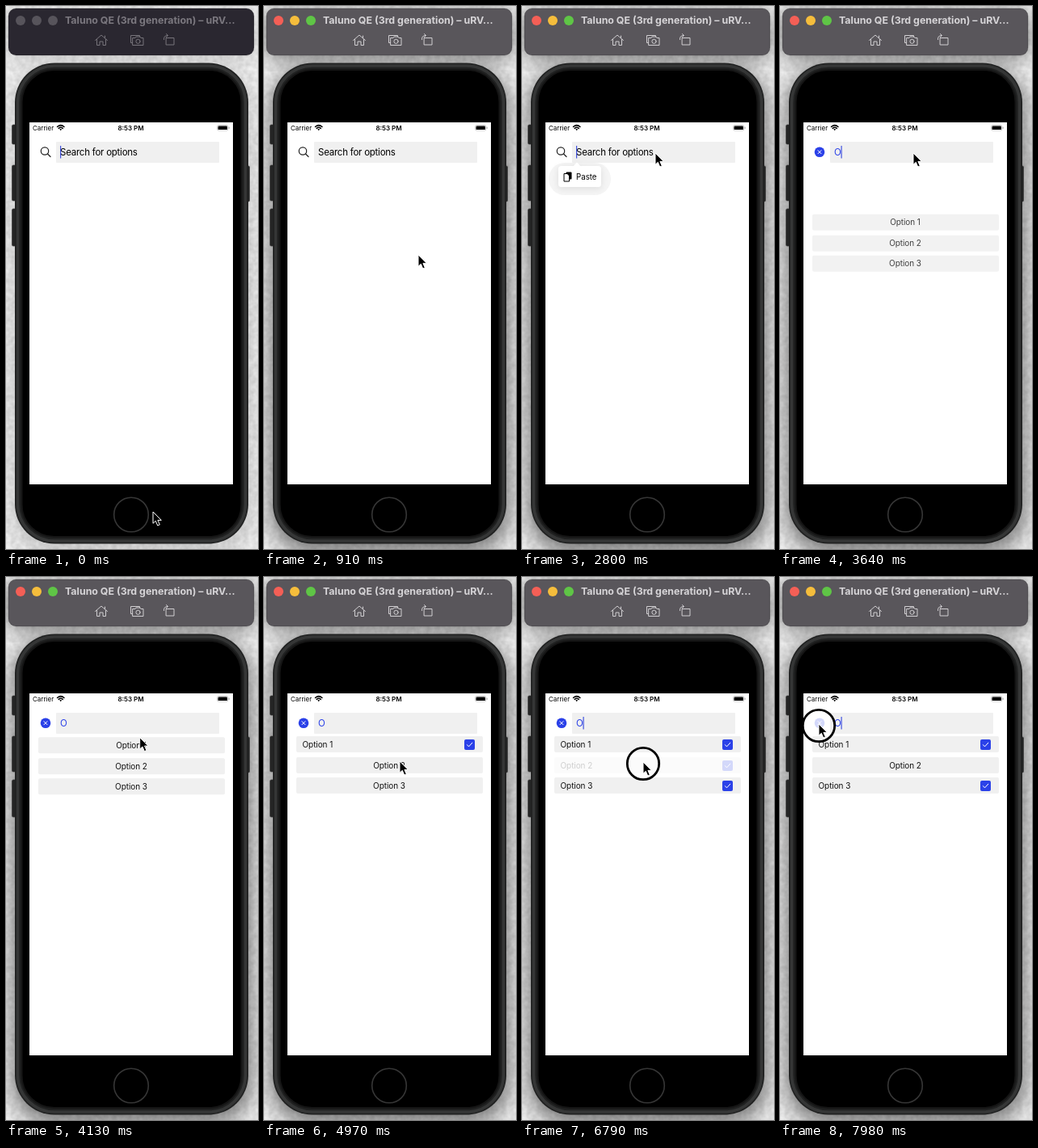
These frames come from a looping animation (312x672 px, 8 s). An HTML page:

```html
<!DOCTYPE html>
<html lang="en">
<head>
<meta charset="utf-8">
<title>Searchable options demo</title>
<style>
  html, body { margin: 0; width: 100%; height: 100%; overflow: hidden; background: #e6e6e6; }
  svg { display: block; width: 312px; height: 672px; font-family: Inter, "Liberation Sans", sans-serif; }
  .shadow { opacity: .16; }
  .bar { fill: #2a2730; }
  .title { fill: #7b787f; font: 700 12.4px Inter, "Liberation Sans", sans-serif; }
  .light { fill: #57545b; }
  .tools { fill: none; stroke: #77747b; stroke-width: 1; stroke-linejoin: round; stroke-linecap: round; }
  .active .shadow { opacity: .5; }
  .active .bar { fill: #59565b; }
  .active .title { fill: #d6d4d7; }
  .active .tools { stroke: #d0ced1; }
  .active .red { fill: #f45f56; }
  .active .yellow { fill: #f5bd3c; }
  .active .green { fill: #5fc546; }
  .field { font-size: 11.5px; letter-spacing: -.24px; }
  .option { font-size: 10px; letter-spacing: -.07px; fill: #111; }
  .blue { fill: #2b41e8; }
  .line { fill: none; stroke-linecap: round; stroke-linejoin: round; }
</style>
</head>
<body>
<svg id="stage" viewBox="0 0 312 672">
  <defs>
    <filter id="plaster" x="0" y="0" width="100%" height="100%" color-interpolation-filters="sRGB">
      <feTurbulence type="fractalNoise" baseFrequency=".16" numOctaves="2" seed="4"/>
      <feColorMatrix values=".16 0 0 0 .825  .16 0 0 0 .825  .16 0 0 0 .825  0 0 0 0 1"/>
    </filter>
    <filter id="blur" x="-30%" y="-30%" width="160%" height="160%"><feGaussianBlur stdDeviation="13"/></filter>
    <filter id="soft" x="-50%" y="-80%" width="200%" height="260%">
      <feDropShadow dx="0" dy="2" stdDeviation="4" flood-opacity=".1"/>
    </filter>
  </defs>

  <rect width="312" height="672" filter="url(#plaster)"/>
  <g class="shadow">
    <rect x="8" y="76" width="296" height="600" rx="50" filter="url(#blur)"/>
    <rect x="3" y="8" width="304" height="56" rx="10" filter="url(#blur)"/>
  </g>

  <!-- Window bar -->
  <rect class="bar" x="3" y="3" width="304" height="58" rx="9.5" stroke="#000" stroke-opacity=".35" stroke-width=".6"/>
  <circle class="light red" cx="18" cy="18" r="6"/>
  <circle class="light yellow" cx="38" cy="18" r="6"/>
  <circle class="light green" cx="58" cy="18" r="6"/>
  <text class="title" x="73" y="22">Taluno QE (3rd generation) – uRV...</text>
  <g class="tools">
    <path d="M110.5 42.5L118 36l7.500 6.500M112.500 41.500V48.500H116V44H120V48.500H123.500V41.500M122.500 39.500V37"/>
    <path d="M156.500 45.500H154.500V36.500H165.500V38M157 39.500H160L161 38H166L167 39.500H170V48.500H157Z"/>
    <circle cx="163.500" cy="43.800" r="2.600"/>
    <path d="M198.500 39.500H208V48H198.500ZM195.500 41.500Q195 36.500 200 36.500M198.500 34.500L200.500 36.500L198.500 38.500"/>
  </g>

  <!-- Phone -->
  <g fill="#242424" stroke="#353535" stroke-width=".7">
    <rect x="7.500" y="147" width="6" height="24" rx="1.500"/>
    <rect x="7.500" y="197" width="6" height="44" rx="1.500"/>
    <rect x="7.500" y="251" width="6" height="46" rx="1.500"/>
    <rect x="296" y="198" width="5.500" height="44" rx="1.500"/>
  </g>
  <rect x="11" y="70.500" width="289" height="595" rx="49" fill="#202121"/>
  <rect x="14.500" y="74" width="282" height="588" rx="45.500" fill="none" stroke="#353636" stroke-width="3.500"/>
  <rect x="19.500" y="79" width="272" height="578" rx="40" stroke="#151515" stroke-width="2"/>
  <circle cx="155" cy="629.500" r="21.300" fill="none" stroke="#363636" stroke-width="1.600"/>
  <rect x="29" y="144" width="252" height="448" fill="#fff"/>

  <!-- Status line -->
  <text x="33" y="154" font-size="8">Carrier</text>
  <text x="154.500" y="154" font-size="8" font-weight="600" text-anchor="middle">8:53 PM</text>
  <g class="line" stroke="#000" stroke-width="1.500" stroke-linecap="butt">
    <path d="M63.500 149.500Q67.700 145.700 72 149.500M65.200 151.400Q67.700 149.200 70.300 151.400"/>
  </g>
  <path d="M66.300 152.500Q67.700 151.500 69.200 152.500L67.700 154.200Z"/>
  <rect x="261.500" y="147.500" width="13.500" height="6.600" rx="2" fill="none" stroke="#aaa" stroke-width=".6"/>
  <rect x="262.500" y="148.500" width="11.500" height="4.600" rx="1.200"/>
  <path d="M276 149.700v2.200" stroke="#999"/>

  <!-- Search field -->
  <rect x="62" y="168" width="202" height="26" rx="1" fill="#f0f0f0"/>
  <g id="empty">
    <text class="field" x="67" y="185">Search for options</text>
    <g class="line" stroke="#222" stroke-width="1.200"><circle cx="48" cy="179.500" r="4.700"/><path d="M51.500 183L55 186.500"/></g>
  </g>
  <g id="filled">
    <text class="field blue" x="67" y="185">O</text>
    <g id="clear">
      <circle class="blue" cx="49" cy="180.700" r="6.300"/>
      <path class="line" d="M47 178.700l4 4m0-4l-4 4" stroke="#fff" stroke-width="1"/>
    </g>
  </g>
  <rect id="caret" y="173" width="1.200" height="15.500" fill="#4052dd"/>

  <g id="popup">
    <rect x="33" y="194" width="77" height="40" rx="20" fill="#f5f5f5"/>
    <path d="M49 198H64L68 193.500L72 198H94a4 4 0 0 1 4 4V220a4 4 0 0 1-4 4H49a4 4 0 0 1-4-4V202a4 4 0 0 1 4-4Z" fill="#fff" filter="url(#soft)"/>
    <rect x="54.500" y="205.500" width="7" height="9" rx="1"/>
    <path d="M52 207.500h4l2.500 2.500v7H52Z" fill="#fff" stroke="#000"/>
    <text x="67" y="214.700" font-size="9.700">Paste</text>
  </g>

  <g id="list"></g>

  <circle id="ring" r="19.700" fill="none" stroke="#000" stroke-width="2.800"/>
  <path id="pointer" d="M0 0V14.300L3.300 11.300L5.700 17L8.300 15.900L5.900 10.400H10.300Z" stroke="#fff" stroke-width="1"/>
</svg>

<script>
const LOOP = 8000, ACTIVATE = 490, TYPED = 3200, SLIDE = 3240;
const $ = id => document.getElementById(id);
const clamp = v => Math.max(0, Math.min(1, v));
const ramp = (t, start, length) => clamp((t - start) / length);
const show = (el, on) => el.style.display = on ? '' : 'none';

// Pointer stops: time, x, y
const stops = [
  [0, 182, 626], [70, 182, 626], [300, 190, 417], [770, 190, 417], [840, 191, 350], [910, 191, 308],
  [1610, 171, 222], [1820, 165, 182], [3800, 165, 182], [4340, 166, 207], [4700, 166, 207],
  [4940, 168, 228], [5230, 168, 230], [5390, 166, 242], [5480, 165, 254], [5850, 165, 262],
  [6200, 165, 262], [6560, 150, 229], [7000, 150, 229], [7560, 48, 182], [LOOP, 48, 182]
];

// Presses: down, up, what is pressed
const taps = [
  [440, 590, 'window'], [1930, 2080, 'field'], [4390, 4550, 0], [5040, 5200, 1],
  [5500, 5650, 2], [6770, 6930, 1], [7900, LOOP, 'clear']
];

const rows = [0, 1, 2].map(i => {
  const row = document.createElementNS('http://www.w3.org/2000/svg', 'g');
  row.setAttribute('transform', `translate(0 ${Math.round(197 + 25.5 * i)})`);
  row.innerHTML = `
    <rect x="40" width="231" height="20" rx="2" fill="#f0f0f0"/>
    <text class="option" y="13.700">Option ${i + 1}</text>
    <g><rect class="blue" x="248" y="4" width="13" height="13" rx="2"/>
    <path class="line" d="M251.500 10.700l2 2.200l4.300-4.700" stroke="#fff"/></g>`;
  $('list').append(row);
  return { row, label: row.children[1], box: row.children[2] };
});

function pointerAt(t) {
  const i = stops.findIndex((s, n) => n && t <= s[0]);
  const [t0, x0, y0] = stops[i - 1], [t1, x1, y1] = stops[i];
  const p = (t - t0) / (t1 - t0), k = p * p * (3 - 2 * p);
  return [x0 + (x1 - x0) * k, y0 + (y1 - y0) * k];
}

// Pressed items dim at once and recover after release
function opacityOf(target, t) {
  return taps.reduce((o, [down, up, what]) =>
    what !== target || t < down ? o : t < up ? .2 : .2 + .8 * ramp(t, up, 250), 1);
}

function caretOn(t) {
  if (t >= TYPED) return (t - TYPED) % 1100 < 550;
  return (t < 2400 ? t : t - 2400) % 1000 < 520;
}

function draw(t) {
  const [x, y] = pointerAt(t), typed = t >= TYPED;
  $('stage').classList.toggle('active', t >= ACTIVATE);
  show($('empty'), !typed);
  show($('filled'), typed);
  $('clear').style.opacity = opacityOf('clear', t);
  show($('caret'), caretOn(t));
  $('caret').setAttribute('x', typed ? 75.5 : 67);
  $('popup').style.opacity = ramp(t, 2300, 200) - ramp(t, 2920, 150);

  const offset = 244 * (1 - ramp(t, SLIDE, 1080)) ** 3;
  $('list').setAttribute('transform', `translate(0 ${offset})`);
  $('list').style.opacity = ramp(t, SLIDE, 500);
  rows.forEach(({ row, label, box }, i) => {
    const selected = taps.filter(([, up, what]) => what === i && t >= up).length % 2 === 1;
    row.style.opacity = opacityOf(i, t);
    show(box, selected);
    label.setAttribute('x', selected ? 47.5 : 155);
    label.setAttribute('text-anchor', selected ? 'start' : 'middle');
  });

  show($('ring'), taps.some(([down, up]) => t >= down && t < up));
  $('ring').setAttribute('transform', `translate(${x} ${y + 2})`);
  $('pointer').setAttribute('transform', `translate(${x} ${y})`);
}

function tick() {
  draw(performance.now() % LOOP);
  requestAnimationFrame(tick);
}
tick();
</script>
</body>
</html>
```
